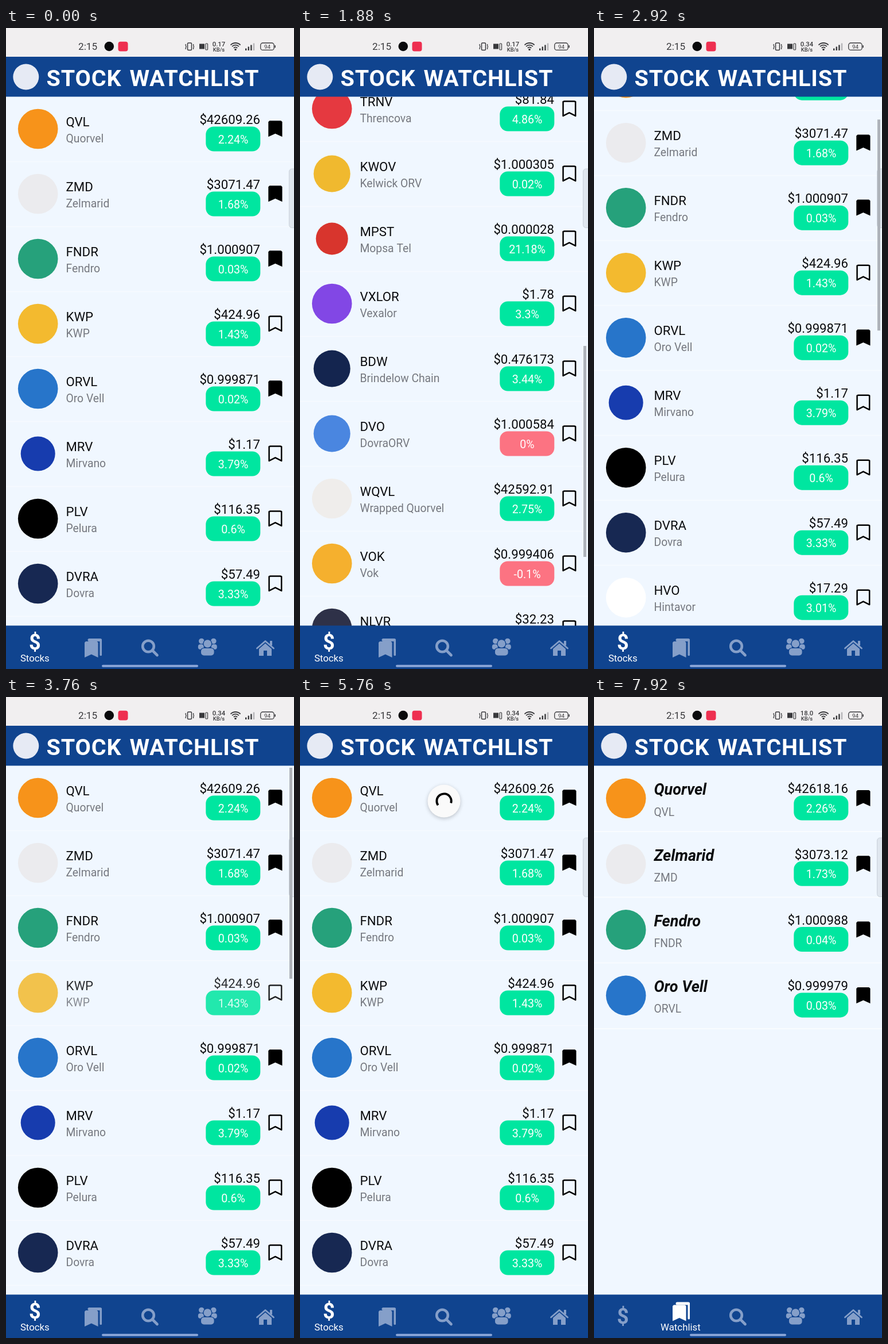
Animation, 502 px wide and 1115 px high, one loop 8 s. Source, as an HTML page with a canvas:

```html
<!DOCTYPE html>
<html lang="en">
<head>
<meta charset="utf-8">
<title>Stock watchlist</title>
<style>
  html, body { margin: 0; width: 100%; height: 100%; overflow: hidden; background: #f0f7ff; }
  canvas { display: block; width: 100vw; height: 100vh; }
</style>
</head>
<body>
<canvas id="stage" width="502" height="1115"></canvas>
<script>
const c = document.getElementById('stage').getContext('2d');
const LOOP = 8000, STEP = 40, TOP = 120, BOTTOM = 1039.5, PITCH = 113, SWITCH = 7240;
const NAVY = '#10448f', GREEN = '#00e6a0', RED = '#fc7382', INK = '#0b0c0e', GREY = '#75787f';
const FONT = 'Roboto, sans-serif';

// symbol, name, price, change, badge colour, saved, badge radius
const coins = [
  ['QVL', 'Quorvel', '42609.26', '2.24', '#f7931a', 1],
  ['ZMD', 'Zelmarid', '3071.47', '1.68', '#ebebee', 1],
  ['FNDR', 'Fendro', '1.000907', '0.03', '#26a17b', 1],
  ['KWP', 'KWP', '424.96', '1.43', '#f3ba2f', 0],
  ['ORVL', 'Oro Vell', '0.999871', '0.02', '#2775ca', 1],
  ['MRV', 'Mirvano', '1.17', '3.79', '#173cae', 0, 30],
  ['PLV', 'Pelura', '116.35', '0.6', '#000', 0],
  ['DVRA', 'Dovra', '57.49', '3.33', '#172852', 0],
  ['HVO', 'Hintavor', '17.29', '3.01', '#fff', 0],
  ['TRNV', 'Threncova', '81.84', '4.86', '#e53940', 0],
  ['KWOV', 'Kelwick ORV', '1.000305', '0.02', '#f0b92f', 0, 32],
  ['MPST', 'Mopsa Tel', '0.000028', '21.18', '#d8352d', 0, 28],
  ['VXLOR', 'Vexalor', '1.78', '3.3', '#8247e5', 0],
  ['BDW', 'Brindelow Chain', '0.476173', '3.44', '#14254f', 0, 32],
  ['DVO', 'DovraORV', '1.000584', '0', '#4a86e0', 0, 32],
  ['WQVL', 'Wrapped Quorvel', '42592.91', '2.75', '#efedeb', 0],
  ['VOK', 'Vok', '0.999406', '-0.1', '#f5b02e', 0],
  ['NLVR', 'Nelvar', '32.23', '5.12', '#2e3148', 0],
  ['GNWK', 'Garnwick', '104.72', '2.08', '#345d9d', 0],
  ['TLME', 'Tolmere', '15.06', '1.91', '#2a5ada', 0]
];
const saved = [[0, '42618.16', '2.26'], [1, '3073.12', '1.73'], [2, '1.000988', '0.04'], [4, '0.999979', '0.03']];

const scrollKeys = [[1480, 0], [1520, 0], [1640, 210], [1760, 650], [1880, 1052], [2000, 1275], [2120, 1341],
  [2480, 1341], [2560, 1220], [2640, 953], [2760, 480], [2880, 150], [3020, 0], [3100, 0]];
const pullKeys = [[3780, 88], [3800, 88], [3940, 150], [4082, 192], [4280, 181], [4300, 181]];
const dimKeys = [[3700, 1], [3720, 1], [3760, 0.86], [3860, 0.45], [3900, 0.45], [4060, 1], [4100, 1]];
const barKeys = [[1500, 0], [1540, 1], [3320, 1], [3570, 0], [3700, 0], [3740, 1], [4400, 1], [4650, 0]];

const clamp = (v, a = 0, b = 1) => Math.min(b, Math.max(a, v));

// Smooth curve through key points, flat at turning points
function curve(keys, t) {
  const n = keys.length - 1;
  if (t <= keys[0][0]) return keys[0][1];
  if (t >= keys[n][0]) return keys[n][1];
  const rate = i => (keys[i + 1][1] - keys[i][1]) / (keys[i + 1][0] - keys[i][0]);
  const slope = i => {
    if (i === 0 || i === n) return 0;
    const a = rate(i - 1), b = rate(i);
    return a * b <= 0 ? 0 : 2 * a * b / (a + b);
  };
  let i = 0;
  while (t > keys[i + 1][0]) i++;
  const d = keys[i + 1][0] - keys[i][0], u = (t - keys[i][0]) / d, w = 1 - u;
  return keys[i][1] * w * w * (1 + 2 * u) + keys[i + 1][1] * u * u * (3 - 2 * u)
    + d * u * w * (slope(i) * w - slope(i + 1) * u);
}

// cubic-bezier(.4, 0, .2, 1)
function fastOutSlowIn(x) {
  let lo = 0, hi = 1;
  for (let k = 0; k < 16; k++) {
    const s = (lo + hi) / 2;
    if (1.2 * s * (1 - s) ** 2 + 0.6 * s * s * (1 - s) + s ** 3 < x) lo = s; else hi = s;
  }
  return lo * lo * (3 - 2 * lo);
}

function text(str, x, y, size, color, align = 'left', style = '') {
  c.font = `${style} ${size}px ${FONT}`;
  c.fillStyle = color;
  c.textAlign = align;
  c.fillText(str, x, y);
}
function box(x, y, w, h, color, r = 0) {
  c.beginPath();
  c.roundRect(x, y, w, h, r);
  c.fillStyle = color;
  c.fill();
}
function frame(x, y, w, h, r, width, color) {
  c.beginPath();
  c.roundRect(x, y, w, h, r);
  c.lineWidth = width;
  c.strokeStyle = color;
  c.stroke();
}
function disc(x, y, r, color) {
  c.beginPath();
  c.arc(x, y, r, 0, 7);
  c.fillStyle = color;
  c.fill();
}
function poly(points, closed = true) {
  c.beginPath();
  points.forEach(p => c.lineTo(p[0], p[1]));
  if (closed) c.closePath();
}

function bookmark(y, filled) {
  const e = filled ? 0 : 1.3;
  poly([[457.3 + e, y - 12], [459.5 + e, y - 14 + e], [479.3 - e, y - 14 + e], [481.5 - e, y - 12],
    [481.5 - e, y + 14 - e], [469.4, y + 8.5 - e], [457.3 + e, y + 14 - e]]);
  c.lineJoin = 'round';
  c.lineWidth = 2.5;
  c.strokeStyle = c.fillStyle = '#000';
  if (filled) c.fill(); else c.stroke();
}

function quote(y, price, change) {
  text('$' + price, 443, y + 47.2, 22.2, INK, 'right');
  box(348.3, y + 51.5, 95, 43, change > 0 ? GREEN : RED, 14);
  text(change + '%', 396, y + 81, 19.6, '#fff', 'center');
}

function coinRow(coin, y) {
  const [symbol, name, price, change, color, kept, r = 34.8] = coin;
  disc(55.7, y + 55.5, r, color);
  text(symbol, 104.5, y + 51, 22.2, INK);
  text(name, 104.5, y + 78.5, 19.3, GREY);
  quote(y, price, change);
  bookmark(y + 55.2, kept);
}

function scrollThumb(off, t) {
  c.globalAlpha = curve(barKeys, t);
  box(494, 123 + off * 0.4088, 5, 367, '#aeb3ba');
  c.globalAlpha = 1;
}

function stockList(t, off) {
  coins.forEach((coin, i) => {
    const y = TOP + i * PITCH - off;
    if (y < TOP - PITCH || y > BOTTOM) return;
    box(0, y + PITCH - 1.5, 502, 2, '#f6faff');
    c.globalAlpha = i === 3 ? curve(dimKeys, t) : 1;
    coinRow(coin, y);
    c.globalAlpha = 1;
  });
}

function savedList() {
  saved.forEach(([index, price, change], i) => {
    const [symbol, name, , , color] = coins[index], y = TOP + i * 114.3;
    box(0, y + 113, 502, 2, '#f9fcff');
    disc(55.7, y + 56.3, 34.8, color);
    text(name, 104.5, y + 50.3, 27, INK, 'left', 'italic bold');
    text(symbol, 104.5, y + 86.5, 19.3, GREY);
    quote(y, price, change);
    bookmark(y + 56, true);
  });
}

function spinner(t) {
  if (t < 3800 || t > 6450) return;
  const size = 1 - clamp((t - 6300) / 150), turn = 2 * Math.PI;
  if (!size) return;
  let start, span;
  if (t < 4082) {
    const u = (t - 3800) / 282;
    start = -0.25 + u * 0.4;
    span = 0.8 * u;
  } else {
    const cycles = (t - 4082) / 1332, n = Math.floor(cycles), p = cycles - n;
    const grow = fastOutSlowIn(clamp(p * 2)), shrink = fastOutSlowIn(clamp(p * 2 - 1));
    start = -0.143 + cycles * 0.6 + 0.79 * (n + shrink);
    span = 0.01 + 0.79 * (grow - shrink);
  }
  c.save();
  c.translate(251, curve(pullKeys, t));
  c.scale(size, size);
  c.shadowColor = 'rgba(0,0,0,.22)';
  c.shadowBlur = 7;
  c.shadowOffsetY = 2;
  disc(0, 0, 28.5, '#fafafa');
  c.shadowColor = 'transparent';
  c.beginPath();
  c.arc(0, 0, 12.7, start * turn, (start + span) * turn);
  c.lineWidth = 3.8;
  c.lineCap = 'butt';
  c.strokeStyle = '#000';
  c.stroke();
  c.restore();
}

function statusBar(t) {
  const ink = '#39393c';
  box(0, 0, 502, 50, '#f1eff0');
  text('2:15', 126, 38, 17.2, ink);
  disc(179.8, 32, 8.3, '#0a0a0c');
  box(195.5, 23.7, 17, 16.8, '#ee2f50', 4);
  frame(316.5, 26, 7, 12.5, 1.5, 1.5, ink);
  for (const x of [312.5, 326]) {
    box(x, 28, 1.3, 3, ink);
    box(x + 0.6, 31, 1.3, 3, ink);
    box(x, 34, 1.3, 3, ink);
  }
  box(337, 27.5, 9, 9, ink);
  frame(348, 27, 3.5, 11, 1, 1.2, ink);
  text(t < 2360 ? '0.17' : t < 6400 ? '0.34' : '18.0', 371, 31.5, 11.3, ink, 'center', '500');
  text('KB/s', 371, 41, 9.4, ink, 'center', '500');
  c.lineWidth = 1.8;
  c.lineCap = 'butt';
  c.strokeStyle = ink;
  for (const r of [4.5, 8.3, 12]) {
    c.beginPath();
    c.arc(400, 38, r, -2.36, -0.78);
    c.stroke();
  }
  disc(400, 37.5, 1.8, ink);
  for (let i = 0; i < 4; i++) box(417 + i * 4.6, 35.5 - i * 3, 2.4, 3.5 + i * 3, i < 3 ? ink : '#b5b4b7');
  frame(443.7, 26, 23.5, 12.4, 4, 1.3, ink);
  box(468.3, 30, 1.6, 4.5, ink, 1);
  text('94', 455.5, 35.8, 9.8, ink, 'center');
}

function header() {
  box(0, 50, 502, 69.6, NAVY);
  disc(34.8, 85, 22.5, '#e6eaf4');
  c.letterSpacing = '0.9px';
  c.wordSpacing = '3px';
  text('STOCK WATCHLIST', 70.5, 101.3, 39.6, '#fff', 'left', 'bold');
  c.letterSpacing = c.wordSpacing = '0px';
}

function tone(a) {
  const mix = v => Math.round(v + (255 - v) * a);
  return `rgb(${mix(133)},${mix(159)},${mix(201)})`;
}

const icons = [
  col => text('$', 50.3, 12, 36, col, 'center', 'bold'),
  col => {
    box(142.5, -16, 24.5, 5, col, 2.5);
    box(163.5, -15, 3.5, 29, col, 1.5);
    poly([[137, -9], [139, -11], [158.5, -11], [160.5, -9], [160.5, 17], [148.8, 11.5], [137, 17]]);
    c.fillStyle = col;
    c.fill();
  },
  col => {
    c.lineWidth = 4.6;
    c.lineCap = 'round';
    c.strokeStyle = col;
    c.beginPath();
    c.arc(248, -2.5, 9.8, 0, 7);
    c.moveTo(255.5, 5);
    c.lineTo(263.5, 13);
    c.stroke();
  },
  col => {
    for (const s of [-1, 1]) {
      disc(351.3 + s * 10.5, -11.5, 4.8, col);
      box(351.3 + s * 11.5 - 5, -6, 10, 9, col, 4);
    }
    disc(351.3, -7, 8, NAVY);
    disc(351.3, -7, 6.8, col);
    box(338.5, 0, 25.6, 14.5, NAVY, 6);
    box(340, 1, 22.6, 12.5, col, 5);
  },
  col => {
    c.fillStyle = c.strokeStyle = col;
    poly([[441, 2], [452, -7.5], [463, 2], [463, 14], [455, 14], [455, 5], [449, 5], [449, 14], [441, 14]]);
    c.fill();
    c.lineWidth = 2.8;
    c.lineCap = 'round';
    poly([[437.5, 1], [452, -11.5], [466.5, 1]], false);
    c.stroke();
    box(460, -12, 4, 8, col);
  }
];

function tabBar(t) {
  const k = fastOutSlowIn(clamp((t - SWITCH) / 200));
  const active = [1 - k, k, 0, 0, 0];
  box(0, BOTTOM, 502, 76, NAVY);
  icons.forEach((draw, i) => {
    c.save();
    c.translate(0, 1078 - 9.5 * active[i]);
    draw(tone(active[i]));
    c.restore();
  });
  ['Stocks', 'Watchlist'].forEach((label, i) => {
    c.globalAlpha = active[i];
    text(label, 50.3 + i * 100.6, 1102.3, 16.8, '#fff', 'center');
  });
  c.globalAlpha = 1;
  box(167, 1107.8, 168, 4, '#8ba6d8', 2);
}

function draw(t) {
  const off = curve(scrollKeys, t), listShown = t < SWITCH;
  box(0, 0, 502, 1115, '#f0f7ff');
  if (listShown) stockList(t, off); else savedList();
  if (listShown) spinner(t);
  box(493.5, 245, 14, 102.5, '#dfe6ee', 5);
  frame(493.5, 245, 14, 102.5, 5, 1, '#c9d1da');
  if (listShown) scrollThumb(off, t);
  statusBar(t);
  header();
  tabBar(t);
}

// The picture is held for one step at a time, 25 per second
const begin = performance.now();
function tick() {
  const t = (performance.now() - begin) % LOOP;
  draw(Math.floor(t / STEP + 0.1) * STEP);
  requestAnimationFrame(tick);
}
tick();
</script>
</body>
</html>
```
